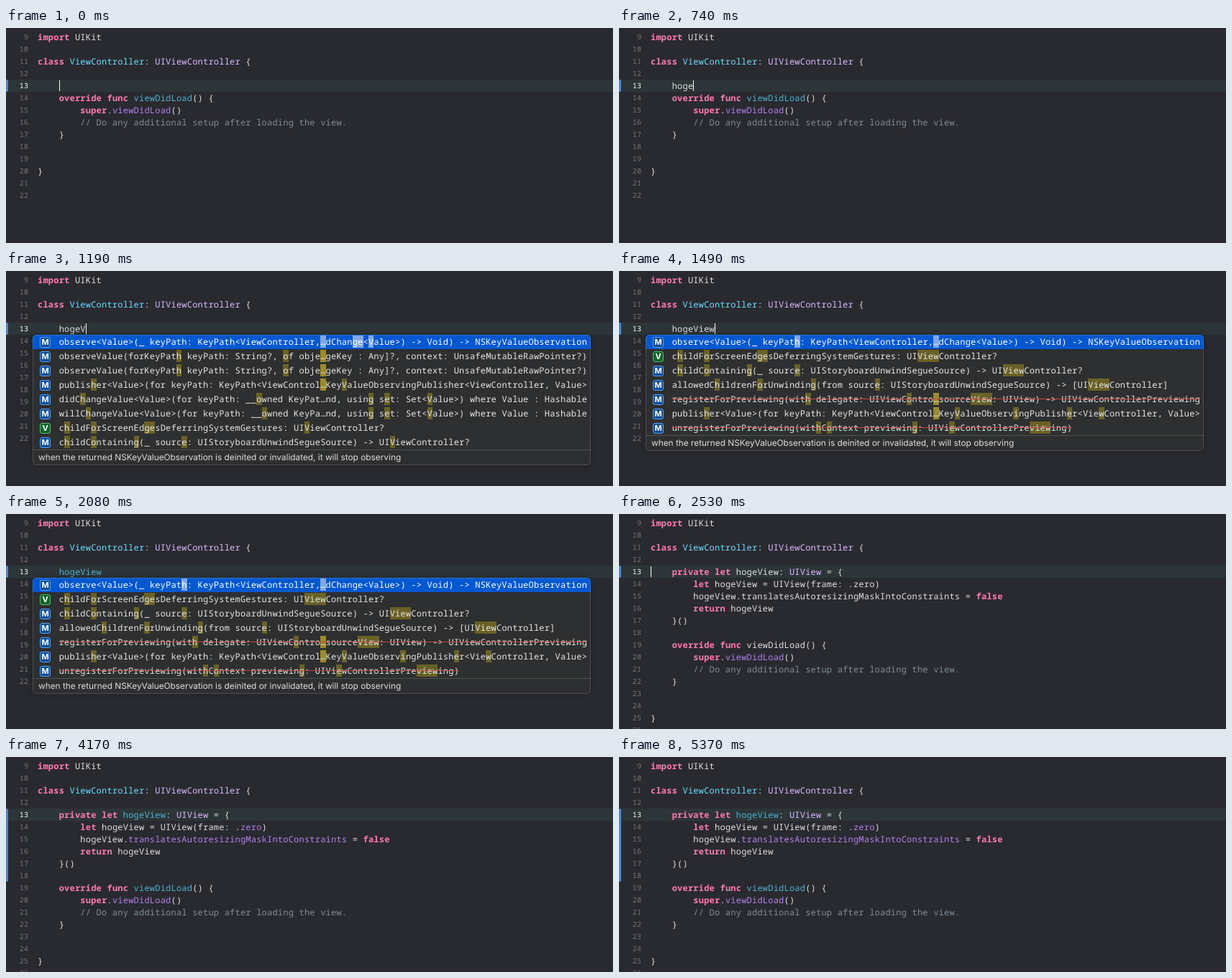
Animation of 844 by 300 pixels, one loop 5.52 s. Source, as an HTML page:

```html
<!DOCTYPE html>
<html lang="en">
<head>
<meta charset="utf-8">
<title>Code completion</title>
<style>
html, body { margin: 0; width: 100%; height: 100%; overflow: hidden; background: #292a30; }
#stage {
  position: relative; width: 844px; height: 300px; overflow: hidden;
  font: 500 12px/17px "Noto Sans Mono", "DejaVu Sans Mono", monospace;
  letter-spacing: .218px; color: #dfdfe0; white-space: pre;
  text-rendering: geometricPrecision; font-variant-ligatures: none;
}
#stage > div, .line span.num, .icon { position: absolute; }
.line { left: 44px; height: 17px; }
.line span.num {
  left: -44px; width: 31.2px; text-align: right;
  font-size: 10px; letter-spacing: .18px; color: #747579;
}
.line.current span.num { color: #fff; }
#band { left: 0; top: 72px; width: 844px; height: 17px; background: #2d3538; }
#bar { left: 0; top: 72px; width: 3px; background: #4486d6; border-radius: 0 2px 2px 0; }
#caret { top: 73px; width: 1px; height: 15px; background: #fff; }
.kw { color: #ff7ab2; font-weight: 700; }
.decl { color: #6bdfff; }
.type { color: #dabaff; }
.name { color: #4eb0cc; }
.member { color: #b281eb; }
.note { color: #7f8c98; }
#popup {
  left: 37px; top: 89px; width: 776px; overflow: hidden; border-radius: 5px;
  background: #2e2f30; box-shadow: 0 0 8px rgba(0, 0, 0, .25);
}
#popup::after {
  content: ""; position: absolute; inset: 0; border-radius: 5px;
  box-shadow: inset 0 0 0 1px rgba(255, 255, 255, .16);
}
.row { position: relative; height: 20px; padding-left: 36.67px; line-height: 20px; color: #e6e6e6; }
.row:first-child { background: #0058d0; color: #fff; }
.gone { text-decoration: line-through 1px #c2453f; }
mark { color: inherit; background: #6a6127; }
mark.cut { background: #9c8a2c; }
.row:first-child mark { background: #7fa8e4; }
.icon {
  left: 10px; top: 3px; width: 13px; height: 13px; border: 1px solid #5ba0ee; border-radius: 3px;
  background: #0f4c94; color: #fff; text-align: center;
  font: 700 11px/13px Inter, "Liberation Sans", sans-serif; letter-spacing: 0;
}
.icon.V { background: #12642b; border-color: #55bb6c; }
.help {
  height: 22px; padding-left: 8px; box-sizing: border-box; border-top: 1px solid #505153;
  font: 400 11.85px/21px Inter, "Liberation Sans", sans-serif; letter-spacing: 0; color: #dedede;
}
</style>
</head>
<body>
<div id="stage"></div>
<script>
const LOOP = 5520, ADVANCE = 7.418, LEFT = 44;
const blinks = [300, 590, 2080, 2530, 3120, 3720, 4170, 4770, 5370];
const changes = [740, 890, 1190, 1490, 2830, 3420, ...blinks];
const stage = document.getElementById("stage");

// First letter of each row: M method, V variable, X deprecated method. Braces mark matched letters.
const action = "M perform(_ aSelector: Selector!, wit{h} {o}bject: Any!) -> Unmana{ge}d<AnyObject>!";
const action2 = action.replace("bject: Any!", "bject1: Any!, with object2: Any!");
const forKey = "M observeValue(forKeyPat{h} keyPath: String?, {o}f obje{…}geKey : Any]?, context: UnsafeMutableRawPointer?)";
const group = "s{ho}uld{G}roupAcc{e}ssibilityChildren";
const edges = "V c{h}ildF{o}rScreenEd{ge}sDeferringSystemGestures: ";
const containing = "M c{h}ildC{o}ntainin{g}(_ sourc{e}: UIStoryboardUnwindSegueSource) -> ";
const publisher = "M publis{h}er<Value>(for keyPath: KeyPath<ViewControl{…}Key{V}alue";
const setArgs = "nd, usin{g} s{e}t: Set<{V}alue>) where Value : Hashable";
const observe = (path, change) =>
  `M observe<Value>(_ ${path}: KeyPath<ViewController,{…}${change}) -> Void) -> NSKeyValueObservation`;

const lists = {
  hoge: [
    observe("keyPath", "dChan{ge}<Value>"),
    `V ${group}: Bool`,
    `M ${group}() -> Bool`,
    action, action,
    `M setS${group.slice(1)}(_ shouldGroupAccessibilityChildren: Bool)`,
    action2, action2
  ],
  hogeV: [
    observe("keyPath", "dChan{ge}<{V}alue>"),
    forKey, forKey,
    publisher + "ObservingPublisher<ViewController, Value>",
    "M didC{h}angeValue<Value>(for keyPath: __{o}wned KeyPat…" + setArgs,
    "M willC{h}angeValue<Value>(for keyPath: __{o}wned KeyPa…" + setArgs,
    edges + "UI{V}iewController?",
    containing + "UI{V}iewController?"
  ],
  hogeView: [
    observe("keyPat{h}", "dChange<Value>"),
    edges + "UI{View}Controller?",
    containing + "UI{View}Controller?",
    "M allowedC{h}ildrenF{o}rUnwindin{g}(from sourc{e}: UIStoryboardUnwindSegueSource) -> [UI{View}Controller]",
    "X registerForPreviewing(wit{h} delegate: UIViewC{o}ntro{…}source{View}: UIView) -> UIViewControllerPreviewing",
    publisher + "Observ{i}ngPublish{e}r<Vie{w}Controller, Value>",
    "X unregisterForPreviewing(wit{h}C{o}ntext previewin{g}: UIVi{e}wControllerPre{view}ing)"
  ]
};

const span = (cls, text) => `<span class="${cls}">${text}</span>`;
const kw = text => text.split(" ").map(w => span("kw", w)).join(" ");
const when = (on, cls, text) => on ? span(cls, text) : text;

function codeLines(t, typed) {
  const done = t >= 2530, named = t >= 3120, resolved = t >= 3420;
  const type = span("type", "UIView");
  const body = done ? [
    `    ${kw("private let")} ${when(named, "name", "hogeView")}: ${type} = {`,
    `        ${kw("let")} hogeView = UIView(frame: .${when(resolved, "member", "zero")})`,
    `        hogeView.${when(resolved, "member", "translatesAutoresizingMaskIntoConstraints")} = ${kw("false")}`,
    `        ${kw("return")} hogeView`,
    "    }()",
    ""
  ] : ["    " + when(t >= 2080, "name", typed)];
  return [
    kw("import") + " UIKit",
    "",
    `${kw("class")} ${span("decl", "ViewController")}: ${span("type", "UIViewController")} {`,
    "",
    ...body,
    `    ${kw("override func")} ${when(!done || named, "name", "viewDidLoad")}() {`,
    `        ${kw("super")}.${span("member", "viewDidLoad")}()`,
    "        " + span("note", "// Do any additional setup after loading the view."),
    "    }",
    "", "", "}", "",
    ...(done ? [] : [""])
  ];
}

function rowHtml(row) {
  const gone = row[0] === "X", kind = gone ? "M" : row[0];
  const text = row.slice(2).replace(/</g, "&lt;").replace(/>/g, "&gt;")
    .replace(/{(.+?)}/g, (_, m) => `<mark${m === "…" ? ' class="cut"' : ""}>${m}</mark>`);
  return `<div class="row"><div class="icon ${kind}">${kind}</div>${span(gone ? "gone" : "", text)}</div>`;
}

function popupHtml(rows) {
  return `<div id="popup">${rows.map(rowHtml).join("")}<div class="help">` +
    "when the returned NSKeyValueObservation is deinited or invalidated, it will stop observing</div></div>";
}

function draw(t) {
  const done = t >= 2530;
  const typed = t < 590 ? "" : t < 740 ? "ho" : t < 1190 ? "hoge" : t < 1490 ? "hogeV" : "hogeView";
  const caretOn = blinks.filter(b => t >= b).length % 2 === 0;
  const caretX = Math.round(LEFT + ADVANCE * (done ? 0 : 4 + typed.length));
  let html = `<div id="band"></div><div id="bar" style="height:${t >= 2830 ? 102 : 17}px"></div>`;
  codeLines(t, typed).forEach((text, i) => {
    html += `<div class="line${i === 4 ? " current" : ""}" style="top:${4 + 17 * i}px">${span("num", i + 9)}${text}</div>`;
  });
  if (caretOn) html += `<div id="caret" style="left:${caretX}px"></div>`;
  if (t >= 890 && !done) html += popupHtml(lists[typed]);
  stage.innerHTML = html;
}

let shown = -1;
function tick() {
  const t = performance.now() % LOOP;
  const step = changes.filter(c => t >= c).length;
  if (step !== shown) draw(t);
  shown = step;
  requestAnimationFrame(tick);
}
tick();
</script>
</body>
</html>
```
